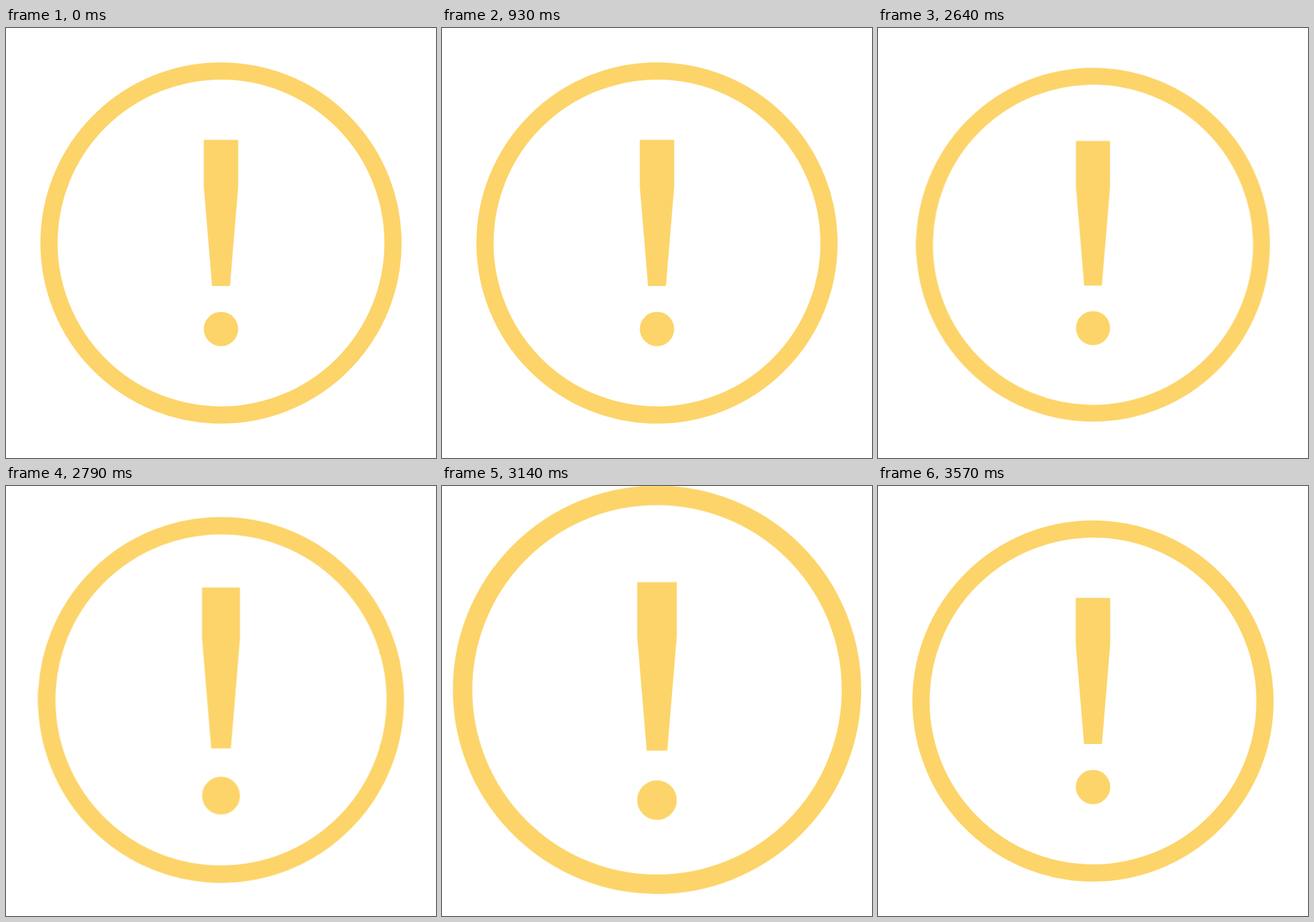
Write an HTML page that moves like this. It is 640 px wide and 640 px high and loops after 7.21 s.

```html
<!DOCTYPE html>
<html lang="en">
<head>
<meta charset="utf-8">
<title>Alert</title>
<style>
  html, body { margin: 0; width: 100%; height: 100%; overflow: hidden; background: #fff; }
  svg { display: block; width: 100%; height: 100%; }
  #ring, #tilt { transform-origin: 320px 448px; }
  #mark { transform-origin: 320px 320px; }
</style>
</head>
<body>
<svg viewBox="0 0 640 640" fill="#fcd469">
  <circle id="ring" cx="320" cy="320" r="256" fill="none" stroke="#fcd469" stroke-width="25.6"/>
  <g id="mark">
    <path id="tilt" d="M294.4 166.4H345.6V236L333.3 384H306.7L294.4 236Z"/>
    <circle cx="320" cy="448" r="25.6"/>
  </g>
</svg>
<script>
  const LOOP = 7210;
  const TICKS = 101;

  const rotate = deg => `rotate(${deg}deg)`;
  const scale = size => `scale(${size})`;
  const smooth = t => t * t * (3 - 2 * t);

  // Tick times fall on whole hundredths of a second.
  const offsetOf = tick => Math.round(tick * LOOP / TICKS / 10) * 10 / LOOP;

  // Eases between [tick, value] keys and holds the end values outside them.
  function valueAt(keys, tick) {
    const next = keys.findIndex(([time]) => time > tick);
    if (next === 0) return keys[0][1];
    if (next < 0) return keys[keys.length - 1][1];
    const [t0, v0] = keys[next - 1];
    const [t1, v1] = keys[next];
    return v0 + (v1 - v0) * smooth((tick - t0) / (t1 - t0));
  }

  // Each tick is a hard step along the eased curve.
  function play(id, toTransform, keys) {
    const frames = Array.from({ length: TICKS + 1 }, (_, tick) => ({
      offset: offsetOf(tick),
      transform: toTransform(valueAt(keys, tick)),
      easing: 'steps(1, end)'
    }));
    const animation = document.getElementById(id)
      .animate(frames, { duration: LOOP, iterations: Infinity });
    animation.startTime = 0;
  }

  play('tilt', rotate, [[5, 0], [6, 2.5], [7, 0], [8, 0], [9, 5], [11, -5], [13, 0]]);
  play('ring', scale, [[32.9, 1], [35.8, 0.973], [46.2, 1.151], [50, 1]]);
  play('mark', scale, [[32.9, 1], [35.8, 0.96], [40.65, 1.152], [45, 1.152], [50, 1]]);
</script>
</body>
</html>
```
